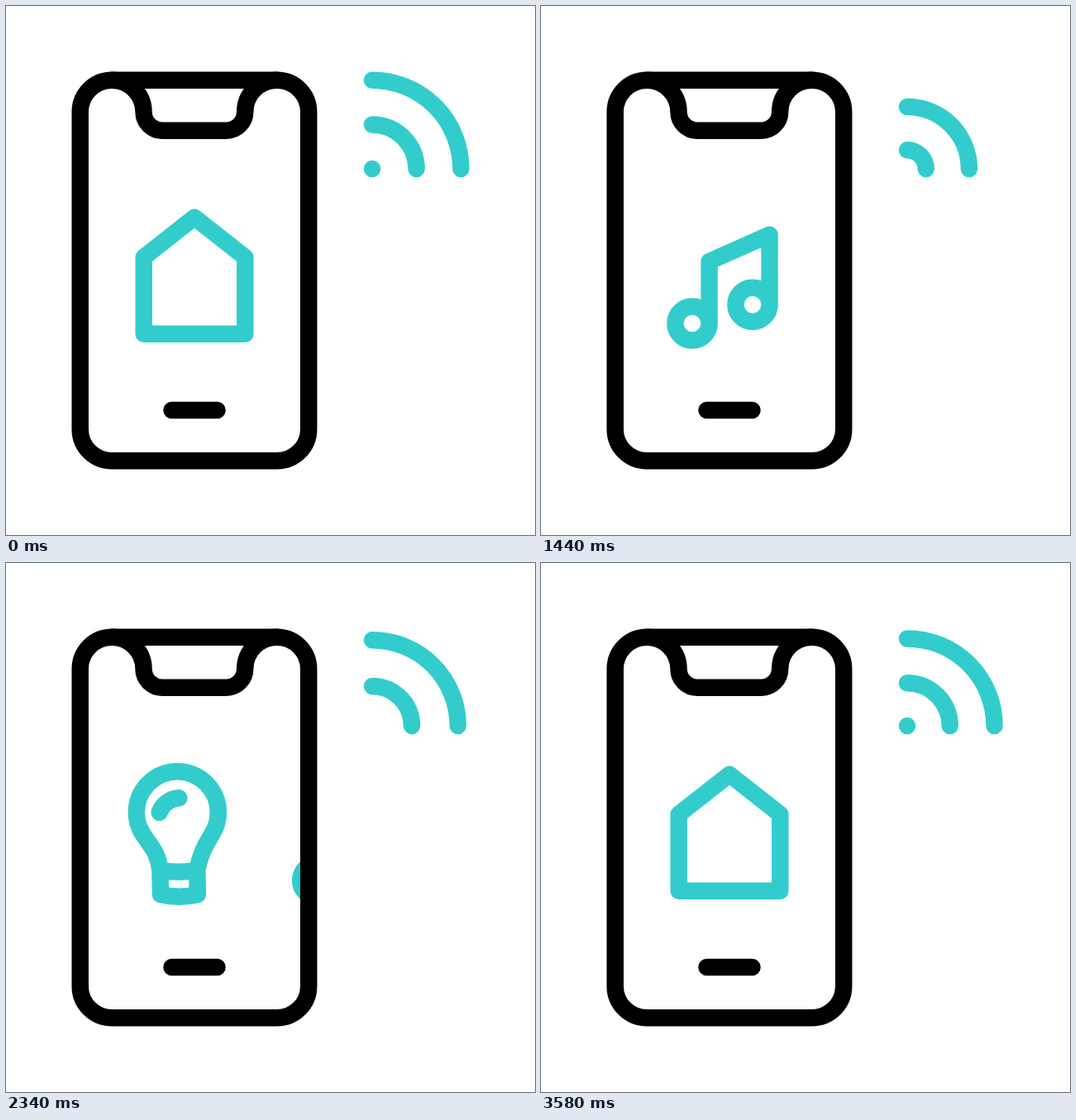
These frames come from a looping animation (640x640 px, 3.6 s). An HTML page with a canvas:

```html
<!DOCTYPE html>
<html lang="en">
<head>
<meta charset="utf-8">
<title>Smart home phone</title>
<style>
  html, body { margin: 0; width: 100%; height: 100%; overflow: hidden; background: #fff; }
  canvas { display: block; width: 100vw; height: 100vh; }
</style>
</head>
<body>
<canvas id="stage" width="640" height="640"></canvas>
<script>
const ctx = document.getElementById('stage').getContext('2d');
const LOOP = 3600;
const TEAL = '#33cccc';
const STROKE = 20.5;

// Phone
const frame = new Path2D();
frame.roundRect(89.7, 89.7, 276.5, 460.6, 38.4);
const notch = new Path2D('M128 89.7 A38.4 38.4 0 0 1 166.5 128 A22.7 22.7 0 0 0 189 150.7 H266.5 A22.7 22.7 0 0 0 289.2 128 A38.4 38.4 0 0 1 328 89.7');
const homeBar = new Path2D('M200.5 489 H255.5');

// Icons, each with x = 0 at its own anchor
const house = new Path2D('M0 255.7 L61.3 304 V396.7 H-61.3 V304 Z');
const bulb = new Path2D(
  'M-21 371.5 C-24 338 -49.5 333 -49.5 301.8 A49.5 49.5 0 0 1 49.5 301.8 C49.5 329 31 333 24 371.5 ' +
  'L24.5 401 Q2 406.5 -20.3 401 L-21 371.5 Q1.5 376 24 371.5 M-21.8 301.8 A27 27 0 0 1 2 284.3');
const note = new Path2D(
  'M21 384 A20.6 20.6 0 1 1 -20.2 384 A20.6 20.6 0 1 1 21 384 V309 L94 276.7 V361.3 ' +
  'A20.6 20.6 0 1 1 52.8 361.3 A20.6 20.6 0 1 1 94 361.3');

const strip = [[house, 0], [bulb, 224.5], [note, 393.5]];
const slides = [[237, -224.5], [986, -214.4], [2037, 214.4], [2509, 224.5]];
const SLIDE_TIME = 375;

// Swipe tilts: start, peak, end, direction
const tilts = [[0, 240, 480, -1], [770, 1013, 1253, -1], [1780, 2030, 2280, 1]];
const MAX_TILT = 2.2 * Math.PI / 180;

const waveStarts = [7, 607, 1187, 1807, 2407, 3005];
const WAVE_SPEED = 0.09;
const WAVE_LIFE = 1335;
const WAVE_LEAD = 40;

function ease(u) {
  u = Math.min(1, Math.max(0, u));
  return u * u * (3 - 2 * u);
}

function hump(t, start, peak, end) {
  return t < peak ? ease((t - start) / (peak - start)) : ease((end - t) / (end - peak));
}

function stroke(path, color) {
  ctx.strokeStyle = color;
  ctx.stroke(path);
}

function drawSpeedLines(t) {
  for (const [start, , , dir] of tilts) {
    const travel = (t - start - 372) * 1.5;
    if (Math.abs(travel) > 320) continue;
    for (const [offset, y, half] of [[7, 215.4, 35.5], [61, 279.5, 19]]) {
      const x = 228 + dir * (travel - offset);
      const line = new Path2D();
      line.moveTo(x - half, y);
      line.lineTo(x + half, y);
      stroke(line, TEAL);
    }
  }
}

function drawScreen(t) {
  ctx.save();
  ctx.clip(frame);
  drawSpeedLines(t);
  const shift = slides.reduce((sum, [start, dist]) => sum + dist * ease((t - start) / SLIDE_TIME), 228);
  for (const [icon, x] of strip) {
    ctx.save();
    ctx.translate(shift + x, 0);
    stroke(icon, TEAL);
    ctx.restore();
  }
  ctx.restore();
}

function drawPhone(t) {
  const angle = tilts.reduce((sum, [a, b, c, dir]) => sum + dir * hump(t, a, b, c), 0) * MAX_TILT;
  const drift = angle < 0 ? 0 : 8 * hump(t, 1745, 2035, 2280);
  const pivotY = t < 1500 ? 427 : 320;
  ctx.save();
  ctx.translate(228 + drift, pivotY);
  ctx.rotate(angle);
  ctx.translate(-228, -pivotY);
  drawScreen(t);
  for (const part of [frame, notch, homeBar]) stroke(part, '#000');
  ctx.restore();
}

function drawWaves(t) {
  for (const start of waveStarts) {
    const age = (t - start + WAVE_LEAD + LOOP) % LOOP - WAVE_LEAD;
    if (age > WAVE_LIFE) continue;
    const r = Math.max(0.05, age * WAVE_SPEED);
    const arc = new Path2D();
    arc.arc(443, 197, r, -Math.PI / 2, 0);
    stroke(arc, TEAL);
  }
}

function draw(t) {
  ctx.fillStyle = '#fff';
  ctx.fillRect(0, 0, 640, 640);
  ctx.lineWidth = STROKE;
  ctx.lineCap = ctx.lineJoin = 'round';
  drawPhone(t);
  drawWaves(t);
}

let origin = null;
function tick(now) {
  if (origin === null) origin = now;
  draw((now - origin) % LOOP);
  requestAnimationFrame(tick);
}
draw(0);
requestAnimationFrame(tick);
</script>
</body>
</html>
```
